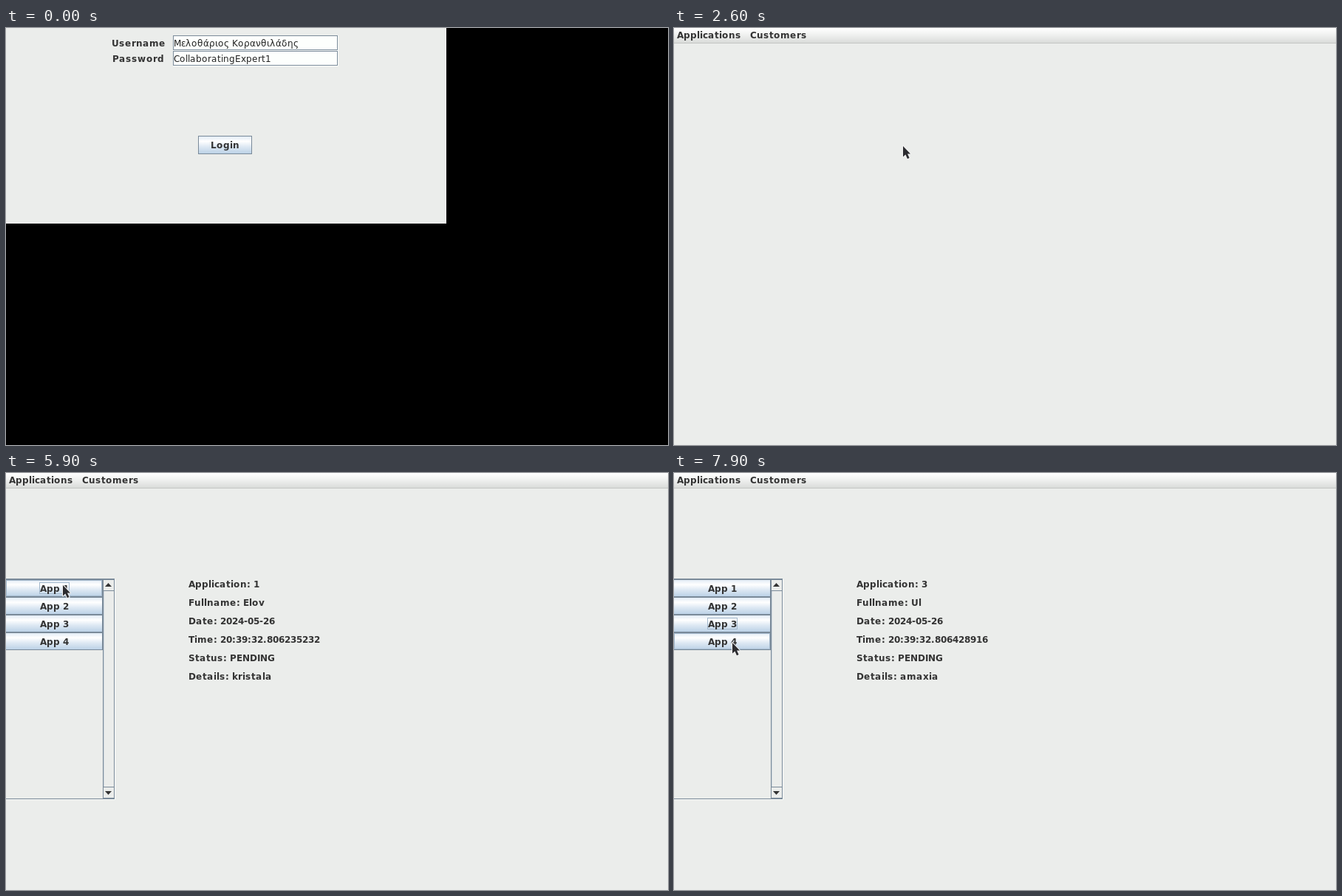
An HTML page with a canvas for the animation above (8000 ms loop, 896 by 565 pixels).

```html
<!DOCTYPE html>
<html lang="en">
<head>
<meta charset="utf-8">
<title>Application desk</title>
<style>
  html, body { margin: 0; width: 100%; height: 100%; overflow: hidden; background: #000; }
  canvas { display: block; }
</style>
</head>
<body>
<canvas id="stage" width="896" height="565"></canvas>
<script>
const ctx = document.getElementById("stage").getContext("2d");
const LOOP = 8000, STEP = 100;
const BOLD = 'bold 12px "DejaVu Sans", sans-serif';
const PLAIN = '12px "DejaVu Sans", sans-serif';
const BG = "#ebedeb", EDGE = "#7a8a99", SHADE = "#a3b8cc", BLUE = "#b8cfe5", INK = "#333";

// time, x, y of the pointer tip
const POINTER = [
  [900, 527, 178], [1900, 310, 160], [2600, 310, 160], [3500, 66, 9],
  [4100, 66, 9], [4400, 62, 33], [4600, 62, 33], [5400, 77, 152],
  [5900, 77, 152], [6300, 74, 180], [6500, 74, 180], [6900, 73, 205],
  [7700, 73, 205], [7900, 79, 230]
];

const LABELS = ["Application", "Fullname", "Date", "Time", "Status", "Details"];
const record = (id, name, nanos, details) =>
  [id, name, "2024-05-26", "20:39:32.806" + nanos, "PENDING", details];
const RECORDS = [
  record("1", "Elov", "235232", "kristala"),
  record("2", "Elov", "419437", "kristala"),
  record("3", "Ul", "428916", "amaxia")
];
const CLICKS = [5700, 6400, 7000];

function rect(x, y, w, h, fill) {
  ctx.fillStyle = fill;
  ctx.fillRect(x, y, w, h);
}

function frame(x, y, w, h, color) {
  ctx.strokeStyle = color;
  ctx.lineWidth = 1;
  ctx.strokeRect(x + .5, y + .5, w - 1, h - 1);
}

// Whole-pixel advances; round letters take the wider step.
const WIDE = "aeoswνοςδλθ";
function advance(ch) {
  return Math.round(ctx.measureText(ch).width + (WIDE.includes(ch) ? .45 : 0));
}

function text(str, x, y, font = BOLD, color = INK) {
  ctx.font = font;
  ctx.fillStyle = color;
  for (const ch of str) {
    ctx.fillText(ch, x, y);
    x += advance(ch);
  }
}

function fade(y, h, stops) {
  const g = ctx.createLinearGradient(0, y, 0, y + h);
  stops.forEach(([at, color]) => g.addColorStop(at, color));
  return g;
}

function button(label, x, y, w, h, textX, state) {
  const fill = state.down ? BLUE
    : fade(y, h, [[0, "#dde8f3"], [.3, "#fff"], [.6, "#dde8f3"], [1, BLUE]]);
  rect(x, y, w, h, fill);
  if (state.down) {
    rect(x + 1, y + 1, w - 2, 1, "#8fa3b5");
    rect(x + 1, y + 1, 1, h - 2, "#8fa3b5");
  } else if (state.hover) {
    frame(x + 1, y + 1, w - 2, h - 2, SHADE);
  }
  frame(x, y, w, h, EDGE);
  if (state.focus) frame(textX - 1, y + 4, 41, 16, SHADE);
  text(label, textX, y + 17);
}

function field(value, y) {
  rect(226, y, 224, 21, "#fbfdfb");
  rect(227, y + 1, 221, 18, "#fdfffd");
  frame(226, y, 223, 20, EDGE);
  text(value, 227, y + 15, PLAIN, "#222");
}

function pointerAt(t) {
  if (t < POINTER[0][0]) return null;
  const i = POINTER.findIndex(p => p[0] > t);
  if (i < 0) return POINTER[POINTER.length - 1].slice(1);
  const [t0, x0, y0] = POINTER[i - 1], [t1, x1, y1] = POINTER[i];
  const k = (t - t0) / (t1 - t0), e = k * k * (3 - 2 * k);
  return [Math.round(x0 + (x1 - x0) * e), Math.round(y0 + (y1 - y0) * e)];
}

function inside(p, x, y, w, h) {
  return !!p && p[0] >= x && p[0] < x + w && p[1] >= y && p[1] < y + h;
}

function drawPointer([x, y]) {
  ctx.save();
  ctx.translate(x, y);
  const arrow = new Path2D("M0 0V14.5L3.4 11.6 6 17.2 8.6 16 6 10.6H10Z");
  ctx.lineJoin = "round";
  ctx.lineWidth = 2;
  ctx.strokeStyle = "#f4f4f4";
  ctx.stroke(arrow);
  ctx.fillStyle = "#2c2c30";
  ctx.fill(arrow);
  ctx.restore();
}

function drawLogin(t, p) {
  rect(0, 0, 896, 565, "#000");
  rect(0, 0, 596, 265, BG);
  text("Username", 143, 25);
  text("Password", 144, 46);
  field("Μελοθάριος Κορανθιλάδης", 10);
  field("CollaboratingExpert1", 31);
  button("Login", 260, 146, 73, 25, 277, {
    hover: inside(p, 260, 146, 73, 25), down: t >= 2300, focus: t >= 2300
  });
}

function drawMenu(t, p) {
  rect(0, 0, 896, 20, fade(0, 20, [[0, "#fff"], [.35, "#f4f5f4"], [1, "#dadcda"]]));
  rect(0, 20, 896, 1, "#c4c6c4");
  const open = t >= 3800 && t < 4600;
  if (open) {
    rect(0, 0, 96, 20, SHADE);
    rect(95, 0, 1, 20, EDGE);
    rect(0, 19, 145, 28, "#eeefee");
    if (inside(p, 0, 24, 144, 22)) rect(0, 24, 144, 22, SHADE);
    frame(-1, 19, 146, 28, "#7d8dbb");
    rect(0, 23, 144, 1, "#7d8dbb");
    text("View Applications", 5, 40);
  }
  text("Applications", 4, 14);
  text("Customers", 103, 14);
}

function scrollArrow(y, dir) {
  frame(131, y, 16, 16, EDGE);
  ctx.fillStyle = INK;
  ctx.beginPath();
  ctx.moveTo(134, y + 8 + 2 * dir);
  ctx.lineTo(143, y + 8 + 2 * dir);
  ctx.lineTo(138.5, y + 8 - 3 * dir);
  ctx.fill();
}

function drawList(t, p, chosen) {
  frame(-1, 143, 148, 299, EDGE);
  rect(0, 442, 148, 1, "#f8faf8");
  rect(147, 144, 1, 298, "#f8faf8");
  rect(131, 144, 1, 298, EDGE);
  rect(132, 160, 1, 266, "#c9d2da");
  scrollArrow(144, 1);
  scrollArrow(425, -1);
  for (let i = 0; i < 4; i++) {
    const y = 144 + 24 * i;
    button("App " + (i + 1), -1, y, 132, 24, 46, {
      hover: inside(p, 0, y, 131, 24),
      down: t >= CLICKS[i] && t < CLICKS[i] + STEP,
      focus: i === chosen
    });
  }
}

function drawDetails(chosen) {
  const values = RECORDS[chosen] || [];
  LABELS.forEach((label, i) =>
    text(`${label}: ${values[i] || ""}`, 247, 155 + 25 * i));
}

function draw(t) {
  const p = pointerAt(t);
  if (t < 2600) {
    drawLogin(t, p);
  } else {
    rect(0, 0, 896, 565, BG);
    if (t >= 4600) {
      const chosen = CLICKS.filter(c => t >= c + STEP).length - 1;
      drawList(t, p, chosen);
      drawDetails(chosen);
    }
    drawMenu(t, p);
  }
  if (p) drawPointer(p);
}

const start = performance.now();
function tick() {
  const t = (performance.now() - start) % LOOP;
  draw(Math.floor(t / STEP) * STEP);
  requestAnimationFrame(tick);
}
tick();
</script>
</body>
</html>
```
